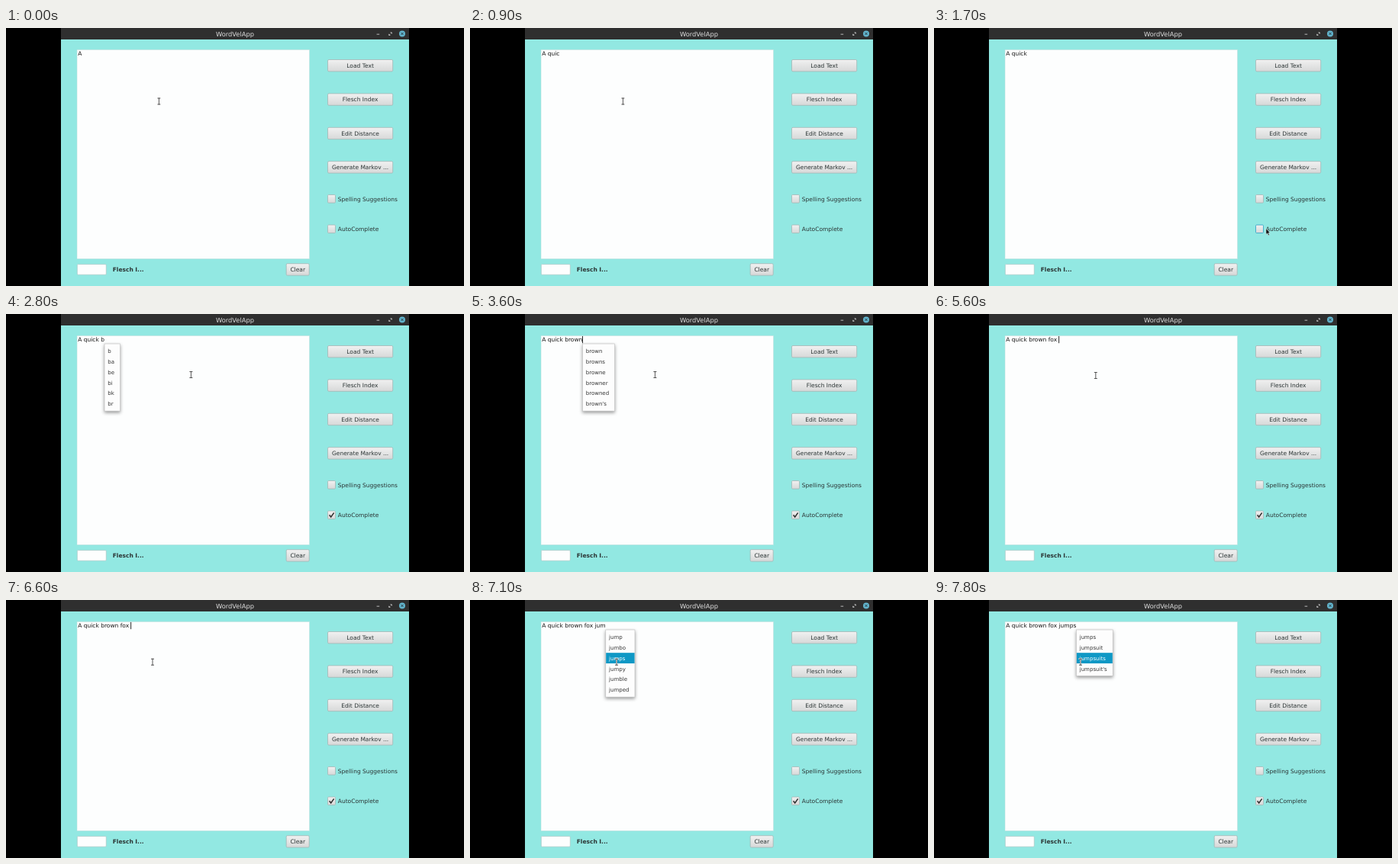
Recreate the animation shown at these times as an HTML page. Size 600 by 338 pixels, loop 8000 ms.

```html
<!DOCTYPE html>
<html lang="en">
<head>
<meta charset="utf-8">
<title>WordVelApp</title>
<style>
  html, body { margin: 0; width: 100%; height: 100%; overflow: hidden; background: #000; }
  svg { display: block; width: 600px; height: 338px; }
  text { font: 7.5px "DejaVu Sans", sans-serif; fill: #2b3434; text-rendering: geometricPrecision; white-space: pre; }
  .mid { text-anchor: middle; }
  .title { font-size: 8.3px; fill: #dedede; }
  .bold { font-weight: bold; }
  #typed { fill: #151515; }
  #popup { filter: drop-shadow(0 2px 2px rgba(0, 0, 0, .4)); }
  #popup text { font-size: 7px; fill: #333; }
  #popup .on { fill: #fff; }
</style>
</head>
<body>
<svg id="stage" viewBox="0 0 600 338">
  <defs>
    <linearGradient id="face" x2="0" y2="1">
      <stop offset="0" stop-color="#f1f1f1"/>
      <stop offset="1" stop-color="#d7d8d8"/>
    </linearGradient>
  </defs>
  <rect width="600" height="338" fill="#000"/>
  <rect x="72" width="456" height="338" fill="#92e8e2"/>
  <rect x="72" width="456" height="15" fill="#2f2f2f"/>
  <text class="mid title" x="300" y="10.6">WordVelApp</text>
  <g fill="none" stroke="#c8c8c8" stroke-width=".9">
    <path d="M485.6 8.2h3.6M502 9.2l1-1M504 7.2l1-1M503.6 5.9h1.7v1.7M501.7 7.8v1.7h1.7"/>
    <circle cx="519" cy="7.5" r="4" fill="#62b5cd" stroke="none"/>
    <path d="M517.4 5.9l3.2 3.2M520.6 5.9l-3.2 3.2" stroke="#263238"/>
  </g>
  <rect x="93" y="28.4" width="304.6" height="274" fill="#fdfefe" stroke="#b5dcd9" stroke-width=".5"/>
  <rect x="93.3" y="309.6" width="38" height="13.6" rx="1.2" fill="#fdfefe" stroke="#a9c6c4" stroke-width=".7"/>
  <text class="bold" x="139.7" y="318.8">Flesch I...</text>
  <g id="controls"></g>
  <path id="tick" d="M423.6 263.2l2.1 2.8 3.9-5.6" fill="none" stroke="#2d2d2d" stroke-width="1.5"/>
  <text id="typed" x="94.2" y="36.1"></text>
  <rect id="caret" y="29" width=".9" height="9.2" fill="#111"/>
  <g id="popup"></g>
  <g id="beam" fill="none" stroke-linecap="square">
    <path d="M-1.5 -4H1.5M0 -4V4M-1.5 4H1.5" stroke="#fff" stroke-width="1.8"/>
    <path d="M-1.5 -4H1.5M0 -4V4M-1.5 4H1.5" stroke="#444" stroke-width=".9"/>
  </g>
  <path id="arrow" d="M0 0V7.6L1.7 6L3 9L4.3 8.4L3 5.5H5.3Z" fill="#0a0a0a" stroke="#e8f6f5" stroke-width=".5"/>
</svg>
<script>
const LOOP = 8000, STEP = 100, ROW = 13.85, TOP = 39, PAD = 2.5;
const $ = id => document.getElementById(id);

function add(parent, tag, attrs, label) {
  const el = document.createElementNS('http://www.w3.org/2000/svg', tag);
  for (const k in attrs) el.setAttribute(k, attrs[k]);
  if (label) el.textContent = label;
  parent.append(el);
  return el;
}

function button(x, y, w, label) {
  add($('controls'), 'rect', { x, y, width: w, height: 15.4, rx: 1.5, fill: 'url(#face)', stroke: '#a5b5b4', 'stroke-width': .8 });
  add($('controls'), 'text', { class: 'mid', x: x + w / 2, y: y + 10.4 }, label);
}

function checkbox(y, label) {
  const box = add($('controls'), 'rect', { x: 421.5, y, width: 10, height: 10.6, rx: 1.2, fill: 'url(#face)', stroke: '#a5b5b4', 'stroke-width': .8 });
  add($('controls'), 'text', { x: 434.8, y: y + 8 }, label);
  return box;
}

['Load Text', 'Flesch Index', 'Edit Distance', 'Generate Markov ...']
  .forEach((label, i) => button(421.5, 41.5 + i * 44.4, 85.2, label));
button(367.2, 308.7, 30, 'Clear');
checkbox(218.5, 'Spelling Suggestions');
const auto = checkbox(258, 'AutoComplete');

// [time, typed text, suggestions]
const typing = [
  [0, 'A'], [200, 'A '], [400, 'A q'], [500, 'A qu'], [700, 'A qui'], [800, 'A quic'],
  [1000, 'A quick'], [1200, 'A quick '],
  [2600, 'A quick b', 'b ba be bi bk br'],
  [2900, 'A quick br', 'br bra bro brad brae brag'],
  [3100, 'A quick bro', 'bro brow broad broil broke brood'],
  [3500, 'A quick brow', 'brow brows brown browse browns browed'],
  [3600, 'A quick brown', 'brown browns browne browner browned brown\'s'],
  [4000, 'A quick brown '],
  [4300, 'A quick brown f', 'f fa fe fm fr ft'],
  [4600, 'A quick brown fo', 'fob foe fog fop for fox'],
  [5000, 'A quick brown fox', 'fox foxy foxed foxes fox\'s foxing'],
  [5500, 'A quick brown fox '],
  [6800, 'A quick brown fox j', 'j jr jab jag jam jar'],
  [7000, 'A quick brown fox ju', 'jug jut judo judy jury just'],
  [7100, 'A quick brown fox jum', 'jump jumbo jumps jumpy jumble jumped'],
  [7300, 'A quick brown fox jump', 'jump jumps jumpy jumped jumper jumping'],
  [7400, 'A quick brown fox jumps', 'jumps jumpsuit jumpsuits jumpsuit\'s']
];

// [start, end] of each caret blink
const blinks = [[500, 700], [1000, 1200], [2300, 2600], [3300, 3500], [3600, 3800],
  [4000, 4200], [5600, 5900], [6200, 6400], [6600, 6800]];

// [time, x, y]
const path = [[0, 200.4, 96], [1300, 200.4, 96], [1700, 435, 262.8], [1900, 435, 262.8],
  [2300, 242.4, 79.5], [5200, 242.4, 79.5], [5900, 192, 81.2], [LOOP, 192, 81.2]];

function pointer(t) {
  const i = path.findIndex(p => p[0] > t);
  const [t0, x0, y0] = path[i - 1], [t1, x1, y1] = path[i];
  const u = (t - t0) / (t1 - t0), e = u * u * (3 - 2 * u);
  return [x0 + (x1 - x0) * e, y0 + (y1 - y0) * e];
}

function drawPopup(list, left, mx, my) {
  const popup = $('popup');
  popup.replaceChildren();
  if (!list) return;
  const words = list.split(' ');
  const frame = add(popup, 'rect', { x: left, y: TOP, height: words.length * ROW + PAD * 2, fill: '#fdfdfd', stroke: '#bdbdbd', 'stroke-width': .6 });
  const labels = words.map((word, i) =>
    add(popup, 'text', { x: left + 4.3, y: TOP + PAD + i * ROW + 9.5 }, word));
  const width = Math.max(...labels.map(l => l.getComputedTextLength())) + 11.8;
  frame.setAttribute('width', width);
  const row = Math.floor((my - TOP - PAD) / ROW);
  if (mx > left && mx < left + width && labels[row]) {
    labels[row].setAttribute('class', 'on');
    const bar = add(popup, 'rect', { x: left + .4, y: TOP + PAD + row * ROW, width: width - .8, height: ROW, fill: '#0f98c5' });
    frame.after(bar);
  }
}

function draw(t) {
  const [, typed, list] = typing.findLast(s => s[0] <= t);
  const [mx, my] = pointer(t);
  $('typed').textContent = typed;
  const end = 94.2 + $('typed').getComputedTextLength();
  $('caret').setAttribute('x', end - .3);
  $('caret').style.display = blinks.some(([a, b]) => t >= a && t < b) ? '' : 'none';
  drawPopup(list, end + .1, mx, my);

  $('tick').style.display = t >= 1800 ? '' : 'none';
  auto.setAttribute('stroke', t >= 1700 && t < 2300 ? '#2a9fc4' : '#a5b5b4');

  const inText = mx > 93 && mx < 397 && my > 28 && my < 302;
  $('beam').style.display = inText ? '' : 'none';
  $('arrow').style.display = inText ? 'none' : '';
  $(inText ? 'beam' : 'arrow').setAttribute('transform', `translate(${mx} ${my})`);
}

const start = performance.now();
let last = -1;
function tick() {
  const t = Math.floor((performance.now() - start) % LOOP / STEP) * STEP;
  if (t !== last) draw(last = t);
  requestAnimationFrame(tick);
}
tick();
</script>
</body>
</html>
```
